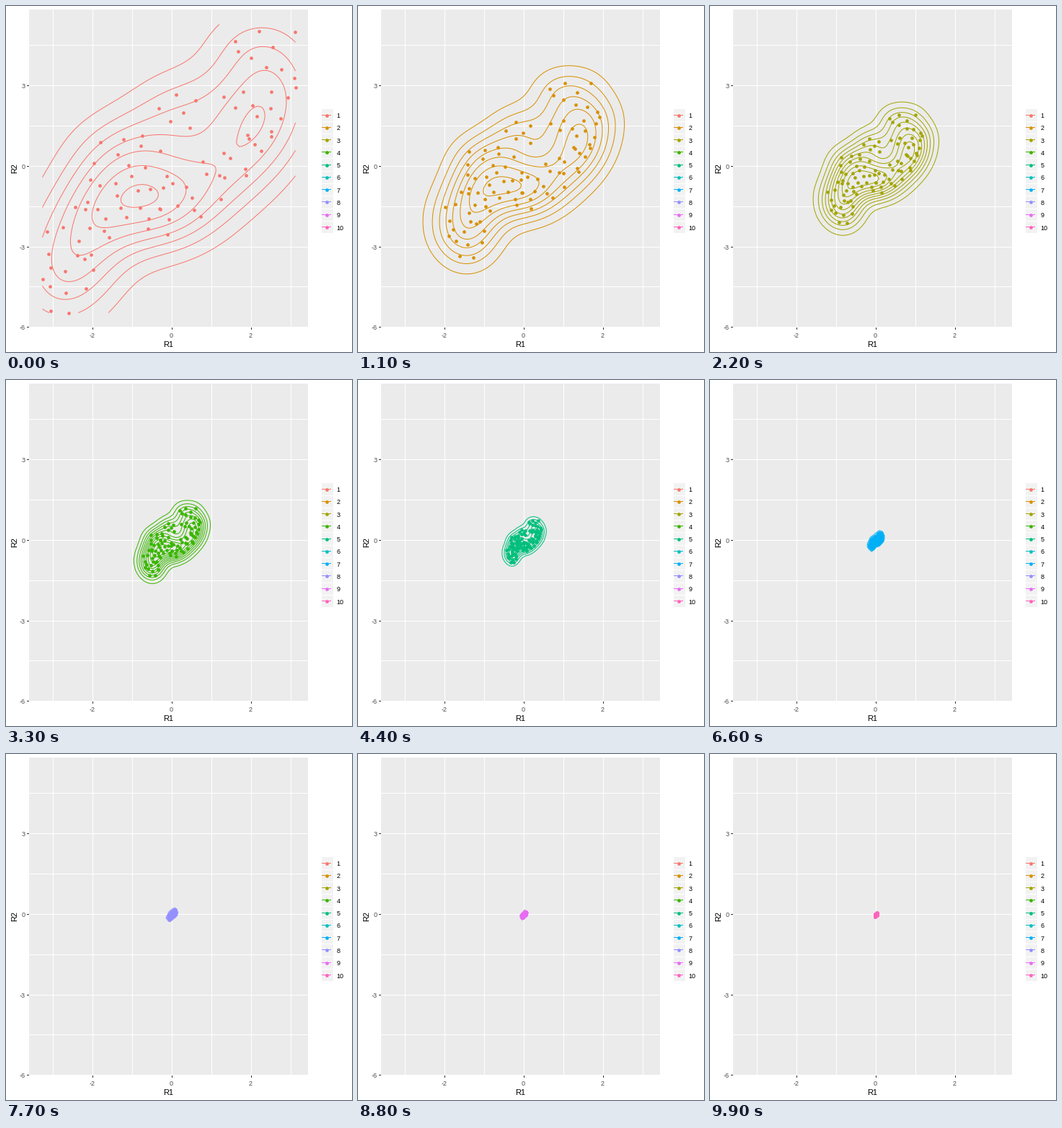
A matplotlib script that plays this animation: 480 by 480 pixels, repeating every 10 s.

```python
import numpy as np
import matplotlib.pyplot as plt
from matplotlib.animation import FuncAnimation
from matplotlib.patches import Rectangle

SIZE, DPI = 480, 72
LEFT, TOP, RIGHT, BOTTOM = 32, 5, 419, 446
X0, Y0, UX, UY = 230.5, 222.9, 55, 37.24  # axis zero and pixels per unit
X_RANGE, Y_RANGE = (50.5, 401.5), (25.5, 425.5)  # extent of the first cloud
COLORS = ["#F8766D", "#D89000", "#A3A500", "#39B600", "#00BF7D",
          "#00BFC4", "#00B0F6", "#9590FF", "#E76BF3", "#FF62BC"]
FRAMES, HOLD = 100, 11
GOLDEN = np.pi * (3 - np.sqrt(5))

plt.rcParams["font.family"] = "Liberation Sans"


def to_px(x, y):
    return X0 + UX * x, Y0 - UY * y


def cluster(rng, n, cx, cy, sx, sy, tilt):
    """Jittered sunflower disc, stretched and sheared, in pixels."""
    k = np.arange(n)
    r, a = 2 * np.sqrt((k + .5) / n), GOLDEN * k
    u, v = np.array([r * np.cos(a), r * np.sin(a)]) + rng.normal(0, .15, (2, n))
    return cx + sx * u, cy + sy * v + tilt * u


def first_cloud():
    rng = np.random.default_rng(4)
    parts = [cluster(rng, 22, 93, 348, 27, 37, -18),
             cluster(rng, 25, 169, 242, 33, 33, 0),
             cluster(rng, 22, 274, 250, 44, 23, -31),
             cluster(rng, 6, 237, 148, 16, 18, 0),
             cluster(rng, 22, 356, 112, 29, 46, -5)]
    x, y = np.hstack(parts)
    x, y = np.clip(x, *X_RANGE), np.clip(y, *Y_RANGE)
    return (x - X0) / UX, (Y0 - y) / UY


def clouds():
    """Each cloud is the one before, contracted, with a fading shear."""
    x, y = first_cloud()
    out = [(x, y)]
    for i in range(len(COLORS) - 1):
        fade = .2 ** i
        x = (.603 + .113 * fade) * x - .107 * fade * y
        y = .62 * y
        out.append((x, y))
    return out


def kernel(grid, v):
    """Gaussian kernels with the normal-reference bandwidth."""
    q1, q3 = np.percentile(v, [25, 75])
    h = 1.06 * min(v.std(ddof=1), (q3 - q1) / 1.34) * len(v) ** -.2
    return np.exp(-.5 * ((grid[:, None] - v) / h) ** 2) / (h * np.sqrt(2 * np.pi))


def pretty_levels(top):
    """Round contour levels, about ten of them."""
    cell = top / 10
    base = 10 ** np.floor(np.log10(cell))
    unit = base
    for mult, bias in ((2, 1.5), (5, 2.75), (10, 1.5)):
        if mult * base - cell >= bias * (cell - unit):
            break
        unit = mult * base
    return np.arange(unit, top, unit)


fig = plt.figure(figsize=(SIZE / DPI, SIZE / DPI), dpi=DPI, facecolor="white")
ax = fig.add_axes([0, 0, 1, 1])
ax.set(xlim=(0, SIZE), ylim=(SIZE, 0))
ax.axis("off")


def line(x, y, color, z=1):
    ax.plot(x, y, color=color, lw=1, zorder=z, snap=False,
            solid_capstyle="butt")


def dots(x, y, color):
    return ax.scatter(x, y, s=4.7 ** 2, color=color, lw=0, zorder=4, snap=False)


def label(x, y, s, size=9, color="black", **kw):
    ax.text(x, y, s, fontsize=size, color=color, va="baseline", **kw)


def draw_panel():
    ax.add_patch(Rectangle((LEFT, TOP), RIGHT - LEFT, BOTTOM - TOP,
                           fc="#EBEBEB", lw=0, zorder=0))
    for v in range(-3, 4):
        x = int(to_px(v, 0)[0]) + .5
        line([x, x], [TOP, BOTTOM], "white")
        if v % 2 == 0:
            line([x, x], [BOTTOM, BOTTOM + 3], "#333333")
            label(x - 1, 460, str(v), color="#4D4D4D", ha="center")
    for v in np.arange(-6, 5, 1.5):
        y = int(to_px(0, v)[1] - .5) + .5
        line([LEFT, RIGHT], [y, y], "white")
        if v % 3 == 0:
            line([LEFT - 3, LEFT], [y, y], "#333333")
            label(27, y + 3.5, f"{v:.0f}", color="#4D4D4D", ha="right")
    label(225, 473, "R1", 11, ha="center")
    label(15.5, 225.5, "R2", 11, ha="center", rotation=90,
          rotation_mode="anchor")


def draw_legend():
    key = 17.28
    for i, c in enumerate(COLORS):
        y = 151 + key * i
        mid = int(y) + .5
        ax.add_patch(Rectangle((436.5, y - key / 2), key, key, fc="#F2F2F2",
                               ec="white", lw=1, zorder=1))
        line([438, 451], [mid, mid], c, 3)
        dots([444.5], [mid], c)
        label(458.5, y + 4, str(i + 1))


def draw_states():
    px, py = np.linspace(*X_RANGE, 100), np.linspace(*Y_RANGE, 100)
    gx, gy = (px - X0) / UX, (Y0 - py) / UY
    states = []
    for (x, y), c in zip(clouds(), COLORS):
        z = kernel(gy, y) @ kernel(gx, x).T / len(x)
        rings = ax.contour(px, py, z, levels=pretty_levels(z.max()),
                           colors=c, linewidths=1, zorder=3)
        states.append((rings, dots(*to_px(x, y), c)))
    return states


draw_panel()
draw_legend()
states = draw_states()


def update(frame):
    now = min(frame // HOLD, len(states) - 1)
    for i, parts in enumerate(states):
        for p in parts:
            p.set_visible(i == now)
    return [p for parts in states for p in parts]


anim = FuncAnimation(fig, update, frames=FRAMES, interval=100,
                     repeat=True, repeat_delay=0, blit=False)
plt.show()
```
